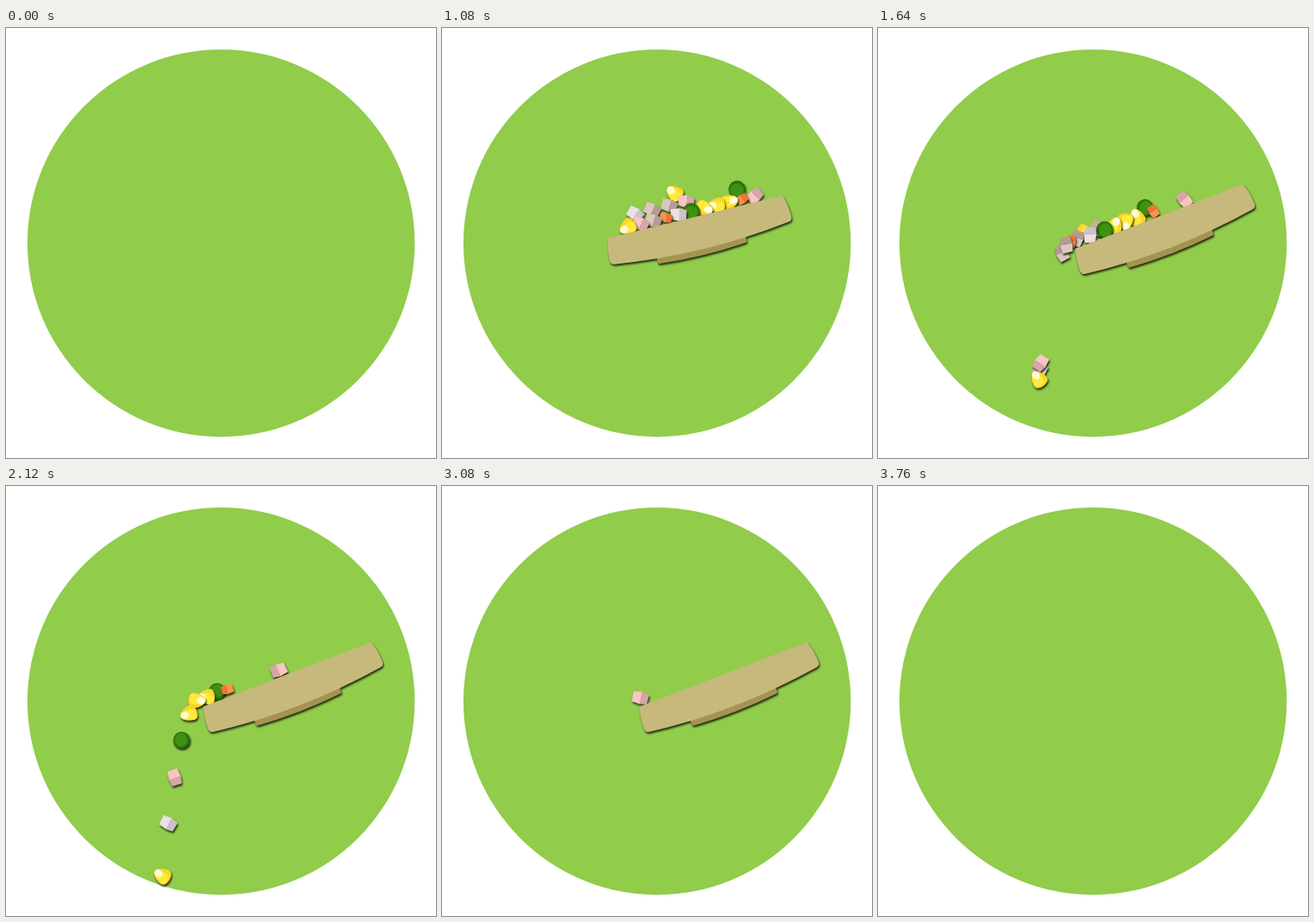
An HTML page for the animation above (4000 ms loop, 500 by 500 pixels).

```html
<!DOCTYPE html>
<html lang="en">
<head>
<meta charset="utf-8">
<title>Diced salad</title>
<style>
  html, body { margin: 0; width: 100%; height: 100%; overflow: hidden; background: #fff; }
  svg { display: block; width: 100vw; height: 100vh; }
  .shade { filter: drop-shadow(1.5px 2px 1px rgba(0, 0, 0, .8)); }
</style>
</head>
<body>
<svg viewBox="0 0 500 500">
  <defs>
    <clipPath id="disc"><circle cx="250" cy="250" r="225"/></clipPath>
    <g id="corn" transform="scale(.95)">
      <path fill="#fdd52b" d="M0-11C6-11 10 1 9.5 5C9 12-9 12-9.5 5C-10 1-6-11 0-11Z"/>
      <path fill="#ffea3c" d="M-1-10C4-9 6 0 4 6C2 10-7 9-8 5C-9 1-5-10-1-10Z"/>
      <ellipse cy="-5.5" rx="4.4" ry="5.2" fill="#fffbd8"/>
    </g>
    <g id="pea">
      <circle r="9.8" fill="#2a7409"/>
      <ellipse cx="-.5" cy=".8" rx="8" ry="7.2" fill="#3f9113"/>
    </g>
  </defs>
  <circle cx="250.1" cy="250.2" r="225.2" fill="#91cc4b"/>
  <g id="bits"></g>
  <g class="shade"><g clip-path="url(#disc)"><g id="board">
    <path fill="#a59350" d="M-55 30V41Q-55 43-53 43.3Q-2 48 49.5 43.3Q51.5 43 51.5 41V30Z"/>
    <path fill="#c6b97b" d="M-104.3 0H104.3Q108.7 12 108.7 26Q108.7 30.5 104.5 31.5Q0 46-104.5 31.5Q-108.7 30.5-108.7 26Q-108.7 12-104.3 0Z"/>
  </g></g></g>
</svg>
<script>
const LOOP = 4000, STEP = 40;
const GRAVITY = .0029, DRIFT = .115;
const SLIDE_START = 1100, ROLL = -.15, SPIN = -.7;
const HALF = 104;
const EDGE = { along: -1.8, height: -9.3 };

const DICE = {
  pink: ['#f8c5c2', '#d8a5a9'],
  gray: ['#ebe0e3', '#cdc2c7'],
  brown: ['#dcc6be', '#b69b94'],
  carrot: ['#ff9152', '#f47239']
};

// Layers of the pile, bottom first; a dash is a gap
const LAYERS = [
  { from: 25, pitch: 15.2, row: 'corn pink brown carrot gray pea corn corn corn carrot pink' },
  { from: 37, pitch: 20.3, row: 'gray brown brown pink - - pea' },
  { from: 87, pitch: 0, row: 'corn' }
];

const clamp = p => Math.min(1, Math.max(0, p));
const span = (t, a, b) => clamp((t - a) / (b - a));
const mix = (a, b, p) => a + (b - a) * p;

function boardPose(t) {
  const tilt = span(t, 960, 1145);
  const push = span(t, 1000, 1160);
  const enter = Math.min(0, t - 1000) * 2 / 3;
  const leave = Math.max(0, t - 3240) * .5;
  return {
    x: 262 + enter + 65 * push + leave,
    y: 222 - 3 * Math.sin(tilt * Math.PI / 2),
    turn: -21.1 * tilt
  };
}

function onBoard(t, along, height, turn) {
  const b = boardPose(t), r = b.turn * Math.PI / 180, x = along - HALF;
  return {
    x: b.x + x * Math.cos(r) - height * Math.sin(r),
    y: b.y + x * Math.sin(r) + height * Math.cos(r),
    turn: b.turn + turn
  };
}

function pile() {
  return LAYERS.flatMap(({ from, pitch, row }, layer) =>
    row.split(' ').map((kind, slot) => ({
      kind,
      along: from + pitch * slot,
      height: -7 - 12.7 * layer,
      turn: kind === 'corn' ? -112 + 159 * slot + 37 * layer : 45 - 7.5 * slot
    })).filter(p => p.kind !== '-')).reverse();
}

// A first clump, a slowing stream, then one straggler
function dropTime(rank, count) {
  if (rank < 3) return 1308 + 10 * rank;
  if (rank === count - 1) return 3140;
  const k = rank - 3;
  return 1545 + 41 * k + 2.2 * k * k;
}

function shape(kind) {
  if (!DICE[kind]) return `<use href="#${kind}"/>`;
  const [light, dark] = DICE[kind];
  const size = kind === 'carrot' ? .76 : 1;
  return `<g transform="scale(${size})">
    <path fill="${light}" d="M-9.3-6L1-7.3V7.3L-8.8 6Z"/>
    <path fill="${dark}" d="M.8-7.3L9.4-5.3L8.8 6L.8 7.3Z"/></g>`;
}

function piecePose(p, t) {
  const held = Math.min(t, p.drop);
  const slid = span(held, SLIDE_START, p.drop) ** 1.15;
  const at = onBoard(held,
    mix(p.along, EDGE.along, slid),
    mix(p.height, EDGE.height, slid),
    p.turn + ROLL * Math.max(0, held - SLIDE_START));
  const fall = t - held;
  return {
    x: at.x - DRIFT * fall,
    y: at.y + GRAVITY / 2 * fall * fall,
    turn: at.turn + SPIN * fall
  };
}

function place(node, { x, y, turn }) {
  node.setAttribute('transform', `translate(${x.toFixed(2)} ${y.toFixed(2)}) rotate(${turn.toFixed(2)})`);
}

const bits = document.getElementById('bits');
const board = document.getElementById('board');
const pieces = pile();
bits.innerHTML = pieces.map(p =>
  `<g class="shade"><g clip-path="url(#disc)"><g class="bit">${shape(p.kind)}</g></g></g>`).join('');
bits.querySelectorAll('.bit').forEach((node, i) => pieces[i].node = node);

// Pieces nearer the edge or higher up go first
const lead = p => p.along + .4 * p.height;
[...pieces].sort((a, b) => lead(a) - lead(b))
  .forEach((p, rank) => p.drop = dropTime(rank, pieces.length));

const start = performance.now();
function draw(now) {
  const t = Math.floor(Math.max(0, now - start) % LOOP / STEP) * STEP;
  place(board, boardPose(t));
  for (const p of pieces) place(p.node, piecePose(p, t));
  requestAnimationFrame(draw);
}
draw(start);
</script>
</body>
</html>
```
